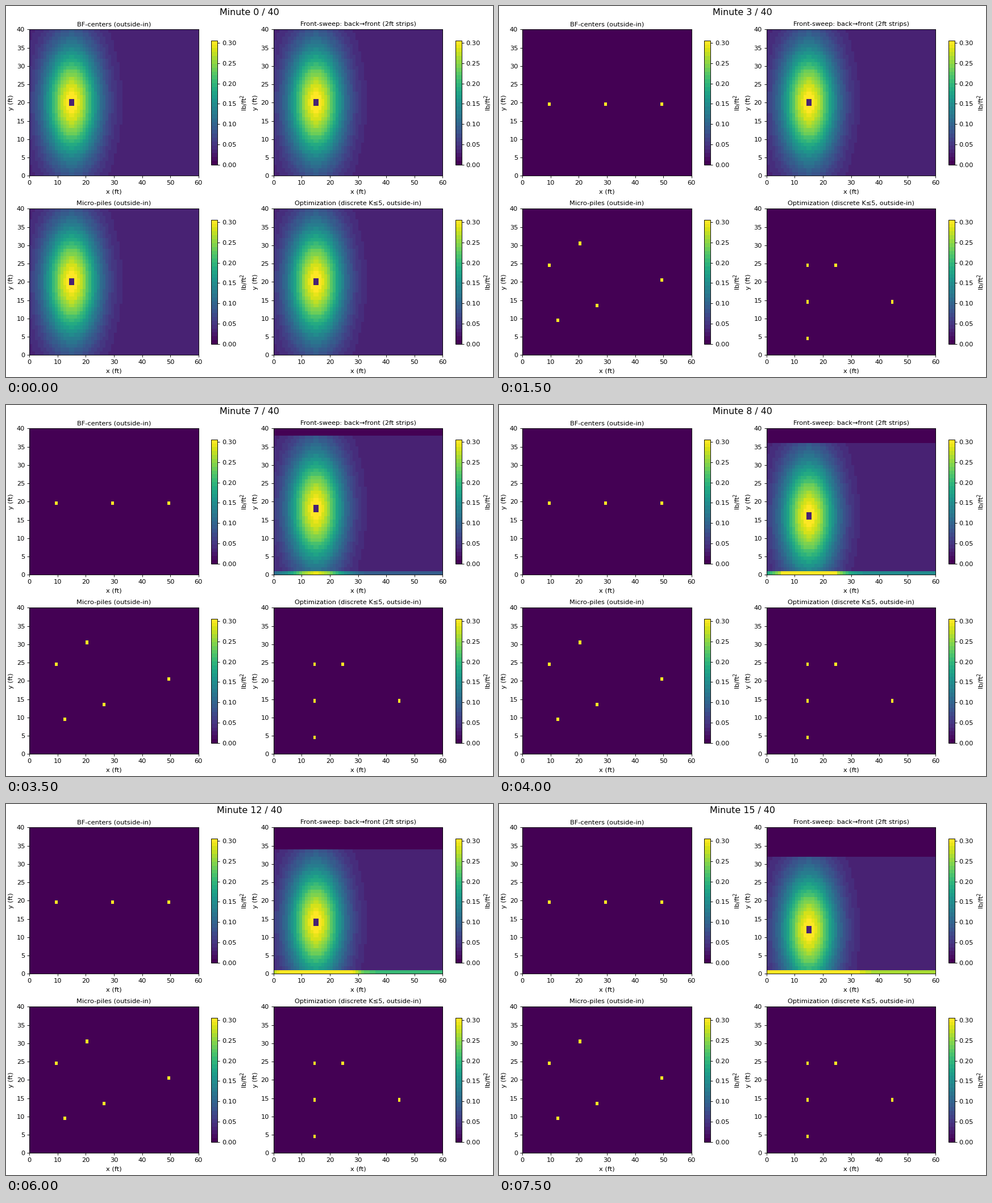
A matplotlib script that plays this animation: 857x654 px, repeating every 8 s.

```python
import numpy as np
import matplotlib.pyplot as plt
from matplotlib.animation import FuncAnimation

W, H, DPI = 857, 654, 81.75
NX, NY = 60, 40
FRAMES, INTERVAL = 16, 500
PEAK, BASE = 0.306, 0.095        # lb/ft², ground cover as a share of the peak
STRIP_MINUTES = 3.75             # time to sweep one 2 ft strip
LEFT, RIGHT = 41.2, 470.7        # panel origins in pixels
TOP, BOTTOM = 41.4, 357.4

plt.rcParams.update({"font.family": "DejaVu Sans", "font.size": 10,
                     "axes.titlesize": 10, "axes.titlepad": 5.3})


def initial_field():
    """Elliptical leaf fall around a tree, with the trunk left bare."""
    x, y = np.meshgrid(np.arange(NX) + 0.5, np.arange(NY) + 0.5)
    fall = np.exp(-((x - 15) / 6.85) ** 2 / 2 - ((y - 20) / 11) ** 2 / 2)
    fall[19:21, 14:16] = 0
    return PEAK * (BASE + (1 - BASE) * fall)


def piled(cells):
    field = np.zeros((NY, NX))
    for col, row in cells:
        field[row, col] = 10 * PEAK
    return field


def swept(field, strips):
    """Push everything two rows forward per strip; the front row collects."""
    shift = 2 * strips
    out = np.zeros_like(field)
    out[:NY - shift] = field[shift:]
    out[0] = field[:shift + 1].sum(axis=0)
    return out


def add_axes(left, top, width, height):
    return fig.add_axes([left / W, 1 - (top + height) / H, width / W, height / H])


def add_panel(left, top, title):
    ax = add_axes(left, top, 297.6, 257.8)
    image = ax.imshow(START, origin="lower", extent=(0, NX, 0, NY), aspect="auto",
                      interpolation="nearest", cmap=CMAP, vmin=0, vmax=PEAK)
    ax.set_title(title)
    ax.set_xlabel("x (ft)", labelpad=4.8)
    ax.set_ylabel("y (ft)")
    ax.set_xticks(range(0, NX + 1, 10))
    ax.set_yticks(range(0, NY + 1, 5))
    bar = add_axes(left + 320.1, top + 19.35, 10.95, 219.2)
    fig.colorbar(image, cax=bar, label="lb/ft$^2$")
    return image


START = initial_field()
CMAP = plt.get_cmap("viridis", 32)
CENTERS = piled([(9, 19), (29, 19), (49, 19)])
MICRO = piled([(9, 24), (20, 30), (12, 9), (26, 13), (49, 20)])
OPTIMAL = piled([(14, 24), (24, 24), (14, 14), (44, 14), (14, 4)])

# The small margin keeps the pixel size from rounding down.
fig = plt.figure(figsize=((W + 1e-6) / DPI, (H + 1e-6) / DPI), dpi=DPI)
heading = fig.suptitle("", fontsize=14, x=0.5, y=1 - 4.2 / H, va="top")

centers = add_panel(LEFT, TOP, "BF-centers (outside-in)")
sweep = add_panel(RIGHT, TOP, "Front-sweep: back→front (2ft strips)")
micro = add_panel(LEFT, BOTTOM, "Micro-piles (outside-in)")
optimal = add_panel(RIGHT, BOTTOM, "Optimization (discrete K≤5, outside-in)")


def update(minute):
    heading.set_text(f"Minute {minute} / 40")
    for image, piles in ((centers, CENTERS), (micro, MICRO), (optimal, OPTIMAL)):
        image.set_data(piles if minute else START)
    sweep.set_data(swept(START, int(minute / STRIP_MINUTES)))
    return heading, centers, sweep, micro, optimal


anim = FuncAnimation(fig, update, frames=FRAMES, interval=INTERVAL,
                     repeat=True, repeat_delay=0, blit=False)
plt.show()
```
